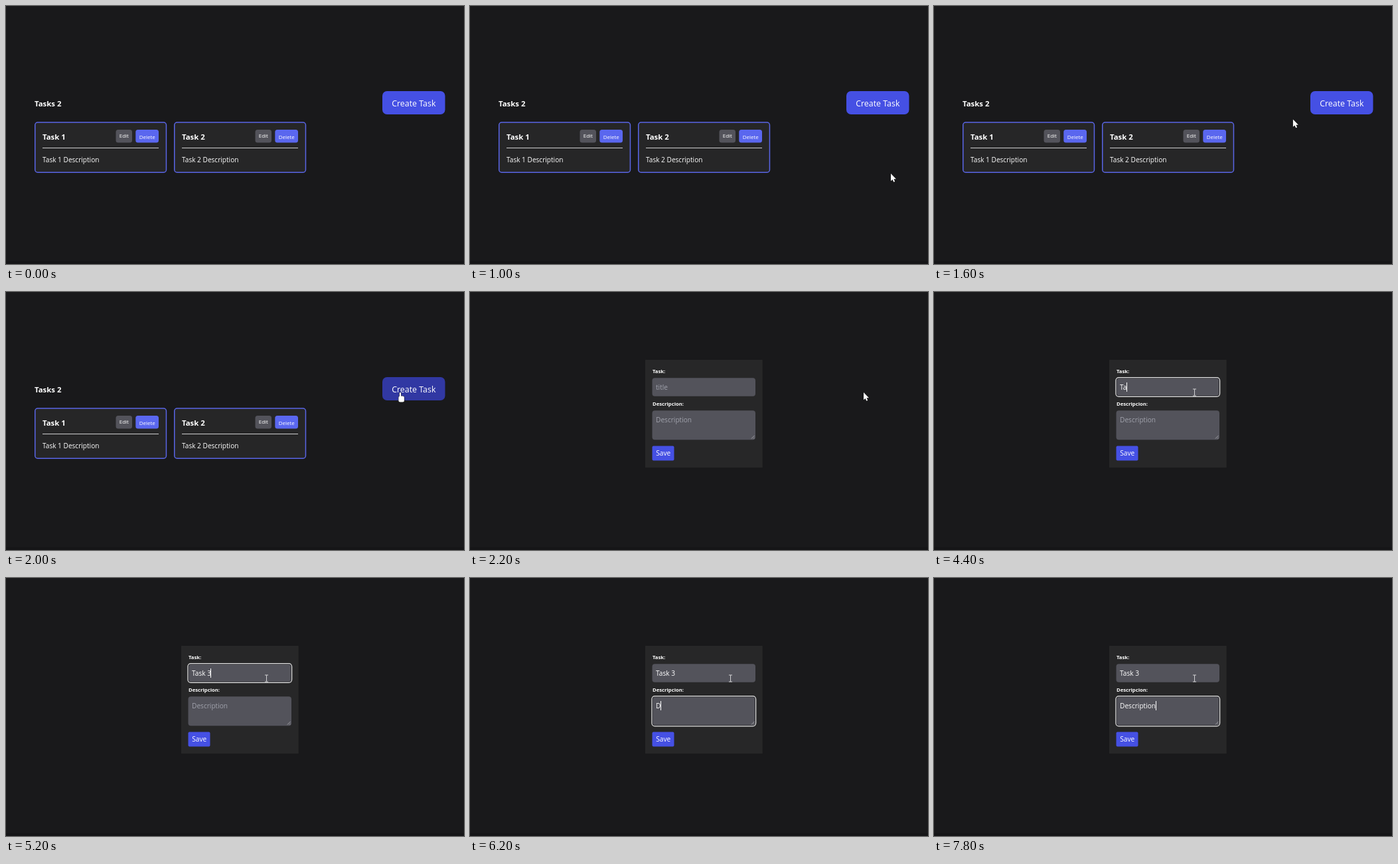
An HTML page with a canvas for the animation above (8 s loop, 690x388 px).

```html
<!DOCTYPE html>
<html lang="en">
<head>
<meta charset="utf-8">
<title>Task list</title>
<style>
  html, body { margin: 0; width: 100%; height: 100%; overflow: hidden; background: #19191b; }
  canvas { display: block; }
</style>
</head>
<body>
<canvas id="stage" width="690" height="388"></canvas>
<script>
const ctx = document.getElementById('stage').getContext('2d');
const LOOP = 8000, STEP = 100;
const INDIGO = '#4550e4', FIELD = '#53535b', WHITE = '#fff';
const APPEAR = 1000, HOVER = 1900, OPEN = 2200, FOCUS = 2900, TAB = 5500;

const progress = (t, start, end) => Math.min(1, Math.max(0, (t - start) / (end - start)));

function box(x, y, w, h, r, fill, stroke, line) {
  ctx.beginPath();
  ctx.roundRect(x, y, w, h, r);
  if (fill) { ctx.fillStyle = fill; ctx.fill(); }
  if (stroke) { ctx.strokeStyle = stroke; ctx.lineWidth = line; ctx.stroke(); }
}

function text(s, x, y, size, { color = WHITE, weight = 500, align = 'left' } = {}) {
  ctx.font = `${weight} ${size}px "Open Sans", "Noto Sans", sans-serif`;
  ctx.textAlign = align;
  ctx.fillStyle = color;
  ctx.fillText(s, x, y);
}

// Typing that picks up speed: first letter at start, last at end
function typed(word, start, end, t) {
  if (t < start) return '';
  return word.slice(0, 1 + Math.round((word.length - 1) * progress(t, start, end) ** 1.3));
}

// Point on a quadratic curve
function curve(u, a, b, c) {
  return a.map((v, i) => (1 - u) ** 2 * v + 2 * u * (1 - u) * b[i] + u * u * c[i]);
}

function pointerAt(t) {
  return t < OPEN
    ? curve(progress(t, APPEAR, 2000), [634, 252], [470, 158], [594, 151])
    : curve(progress(t, 2300, FOCUS), [593, 151], [490, 169], [392.5, 151]);
}

const arrow = new Path2D('M0 0V11.2L2.5 8.9 4.3 12.8 6.2 12 4.5 8.2H8Z');
const beam = new Path2D('M-2.5-5H2.5M0-5V5M-2.5 5H2.5');
const hand = new Path2D();
hand.roundRect(-1.2, 0, 2.3, 10, 1.1);
hand.roundRect(-2.6, 5.6, 8.6, 9, 2.5);

function pointer(shape, x, y) {
  ctx.save();
  ctx.translate(x, y);
  ctx.strokeStyle = shape === beam ? '#d0d0d2' : '#111';
  ctx.lineWidth = 1;
  ctx.stroke(shape);
  if (shape !== beam) {
    ctx.fillStyle = WHITE;
    ctx.fill(shape);
  }
  ctx.restore();
}

function card(x, n) {
  box(x + 0.75, 175, 197.7, 75.2, 4, '#262627', '#5965e6', 1.5);
  text(`Task ${n}`, x + 12, 200.5, 11.4, { weight: 700 });
  box(x + 122.5, 186, 24.5, 19.5, 3.5, FIELD);
  text('Edit', x + 134.8, 198.2, 8, { align: 'center' });
  box(x + 152.3, 186, 34.7, 19.5, 3.5, '#5a67ef');
  text('Delete', x + 169.7, 199.5, 8, { align: 'center' });
  ctx.fillStyle = '#cfcfd0';
  ctx.fillRect(x + 12, 213, 175, 1);
  text(`Task ${n} Description`, x + 12, 235, 10.1);
}

function listView(hover) {
  text('Tasks 2', 43, 150.5, 11.4, { weight: 700 });
  box(567, 128, 94.5, 35, 7, hover ? '#3138a3' : INDIGO);
  text('Create Task', 614.3, 151, 12.4, { align: 'center' });
  card(43, 1);
  card(253, 2);
}

function field(label, y, h, value, hint, focused, caret) {
  text(label, 275, y - 7.7, 7.7, { weight: 700 });
  box(274.5, y, 155.5, h, 4, FIELD);
  if (focused) {
    box(274.9, y + 0.4, 154.7, h - 0.8, 3.5, null, '#1b1b1e', 0.8);
    box(273.9, y - 0.6, 156.7, h + 1.2, 4.5, null, '#e4e4e4', 1.2);
  }
  text(value || hint, 280, y + 17.8, 10.15, value ? {} : { color: '#a0a2ac', weight: 400 });
  if (caret) {
    const w = value ? ctx.measureText(value).width : 0;
    ctx.fillStyle = WHITE;
    ctx.fillRect(Math.floor(280 + w), Math.round(y + 6.5), 1, 14);
  }
}

function formView(t) {
  const inTitle = t >= FOCUS && t < TAB, inBody = t >= TAB;
  const title = typed('Task 3', 4100, 5000, t);
  const body = typed('Description', 6200, 7800, t);
  // An empty field's caret blinks; typing keeps it lit
  const blinkOn = (t - (inBody ? TAB : FOCUS)) % 1100 < 500;

  box(264, 102, 176.7, 162, 0, '#272728');
  field('Task:', 129.2, 27.5, title, 'title', inTitle, inTitle && (title || blinkOn));
  field('Descripcion:', 178.2, 44, body, 'Description', inBody, inBody && (body || blinkOn));

  ctx.strokeStyle = '#c4c4c8';
  ctx.lineWidth = 0.7;
  ctx.beginPath();
  for (const d of [4.5, 1.5]) {
    ctx.moveTo(428.5 - d, 220.5);
    ctx.lineTo(428.5, 220.5 - d);
  }
  ctx.stroke();

  box(274.5, 231.5, 33, 21.9, 2, INDIGO);
  text('Save', 291.2, 246.2, 10.15, { align: 'center' });
}

function draw(t) {
  ctx.fillStyle = '#19191b';
  ctx.fillRect(0, 0, 690, 388);
  ctx.fillStyle = '#151517';
  ctx.fillRect(0, 384, 690, 4);

  const hover = t >= HOVER && t < OPEN;
  if (t < OPEN) listView(hover); else formView(t);

  // The pointer is hidden for a moment after the click into the form
  if (t >= APPEAR && (t < FOCUS || t >= FOCUS + 300)) {
    const [x, y] = pointerAt(t);
    pointer(hover ? hand : t >= OPEN && x < 430 ? beam : arrow, x, y);
  }
}

function frame() {
  const t = performance.now() % LOOP;
  draw(Math.floor(t / STEP) * STEP);
  requestAnimationFrame(frame);
}
frame();
</script>
</body>
</html>
```
